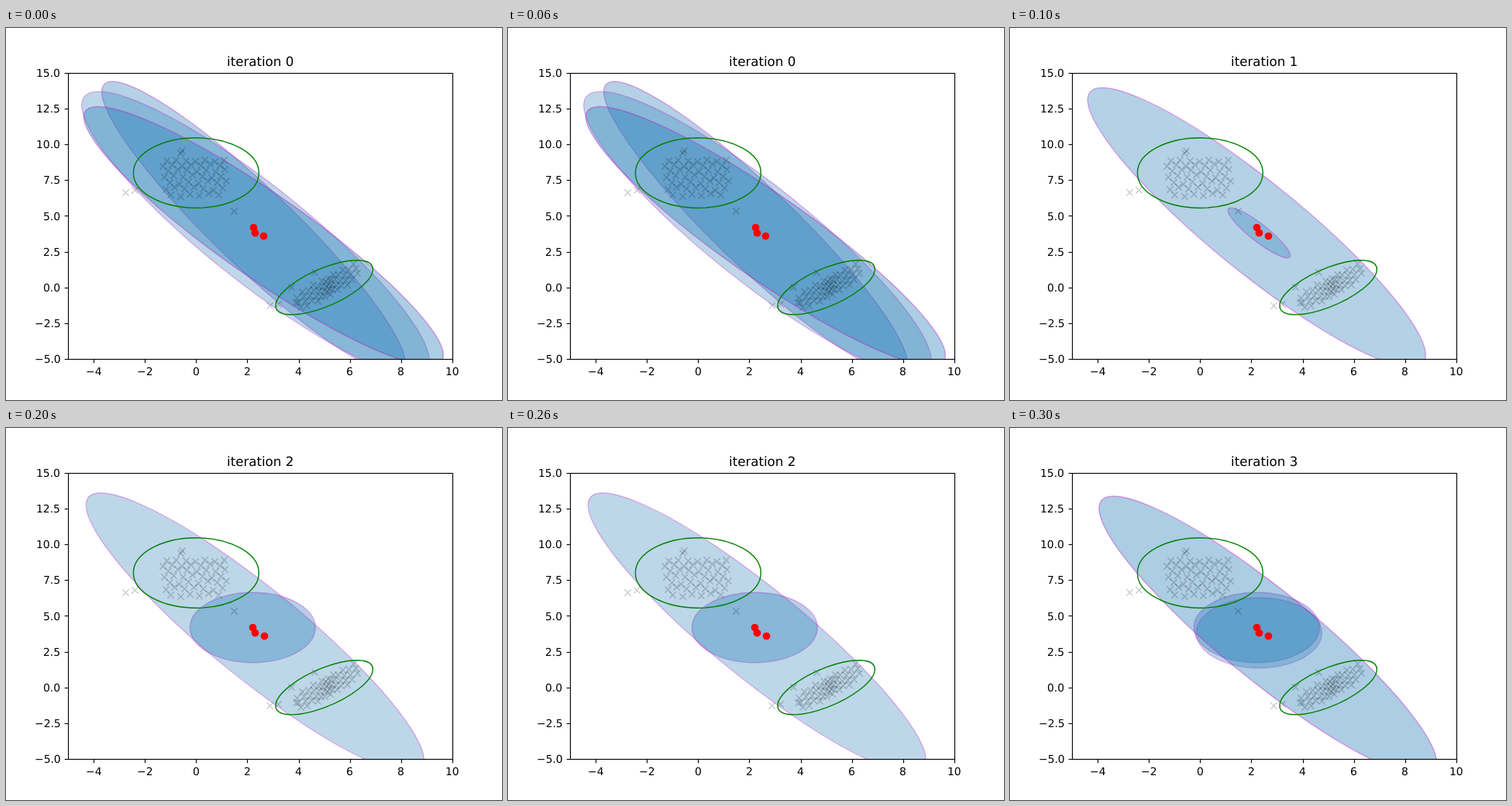
Animation, 640 px wide and 480 px high, one loop 0.4 s. Source, as an HTML page:

```html
<!DOCTYPE html>
<html lang="en">
<head>
<meta charset="utf-8">
<title>Mixture fit</title>
<style>
  html, body { margin: 0; width: 100%; height: 100%; overflow: hidden; background: #fff; }
  svg { display: block; width: 640px; height: 480px; }
  text { font: 13.889px "DejaVu Sans", sans-serif; text-rendering: geometricPrecision; white-space: pre; }
  #title text { font-size: 16.667px; }
  circle { vector-effect: non-scaling-stroke; }
</style>
</head>
<body>
<svg viewBox="0 0 640 480">
  <clipPath id="plot"><rect x="80" y="57.6" width="496" height="369.6"/></clipPath>
  <g id="blobs" clip-path="url(#plot)" fill="#1f77b4" stroke="#bf00bf" stroke-width="1.389"></g>
  <g id="marks" fill="none" stroke="#000" stroke-opacity=".2" stroke-width="1.389"></g>
  <g id="truth" fill="none" stroke="#008000" stroke-width="1.389"></g>
  <g id="means" fill="#f00"></g>
  <g id="axes" stroke="#000" stroke-width="1.111" fill="none"></g>
  <g id="labels"></g>
  <g id="title"></g>
</svg>
<script>
function add(parent, tag, attrs) {
  const el = document.createElementNS("http://www.w3.org/2000/svg", tag);
  for (const k in attrs) el.setAttribute(k, attrs[k]);
  return document.getElementById(parent).appendChild(el);
}
const px = x => 80 + (x + 5) * 496 / 15;
const py = y => 427.2 - (y + 5) * 369.6 / 20;
const snap = v => Math.floor(v + 0.5) + 0.5;
const center = v => Math.floor(v) + 0.5;

// Text starts on a whole pixel; align 0.5 centers it, 1 sets it flush right
function label(parent, text, x, y, align) {
  const el = add(parent, "text", { y: Math.round(y) });
  el.textContent = text.replace("-", "\u2212");
  el.setAttribute("x", Math.round(x - el.getComputedTextLength() * align));
  return el;
}

// Axes
add("axes", "rect", { x: 80.5, y: 58.5, width: 496, height: 369 });
for (let v = -4; v <= 10; v += 2) {
  add("axes", "path", { d: `M${snap(px(v))} 427.5v4.86` });
  label("labels", String(v), px(v), 447.5, 0.5);
}
for (let v = -5; v <= 15; v += 2.5) {
  add("axes", "path", { d: `M80.5 ${snap(py(v))}h-4.86` });
  label("labels", v.toFixed(1), 70.28, py(v) + 5.28, 1);
}
const titles = [0, 1, 2, 3].map(n => label("title", `iteration ${n}`, 328, 49.2, 0.5));

// Ellipse with half extents w, h and correlation r, mapped from a unit circle
const place = ([x, y], [w, h, r]) =>
  `matrix(${w} ${h * r} 0 ${h * Math.sqrt(1 - r * r)} ${x} ${y})`;

// 95% contour of a Gaussian with equal variances
function contour(variance, cov) {
  const reach = Math.sqrt(5.991 * variance);
  return [reach * 496 / 15, reach * 369.6 / 20, -cov / variance];
}
const round = contour(1, 0);
add("truth", "circle", { r: 1, transform: place([px(0), py(8)], round) });
add("truth", "circle", { r: 1, transform: place([px(5), py(0)], contour(0.6, 0.4)) });

// Samples: a few outliers, then two evenly scattered clusters
const cross = (x, y) => add("marks", "path", {
  d: `M${center(x) - 4.17} ${center(y) - 4.17}l8.34 8.34m0 -8.34l-8.34 8.34`
});
[[154, 212], [166, 209], [294, 236], [225, 161], [227, 158],
 [340, 358], [351, 356], [368, 334], [374, 354], [398, 315]].forEach(p => cross(...p));
for (let i = 1; i <= 48; i++) {
  const u = i * 0.7549 % 1, v = i * 0.5698 % 1;
  cross(201 + 86 * u, 168 + 50 * v ** 1.2);
  const s = 2 * u - 1, along = 42 * s * (0.5 + 0.5 * Math.abs(s));
  cross(415 + along, 333 - 0.53 * along + 26 * (v - 0.5));
}

// Fitted components
const wide = [218.1, 180.5, 0.913];
const narrow = [40.3, 32.4, 0.9];
const settled = [[318.3, 257.5], [321.4, 264.3], [333, 268.5]];
const initial = [[319.5, 257.5], [321.9, 264.4], [332.4, 268.5]];
const guesses = [[196, 188.5, 0.93], [224.2, 182.5, 0.902], [232, 167, 0.92]];

// Each iteration hands the wide fit to the next component; passed ones turn round
function shape(n, k) {
  if (n === 0) return guesses[k];
  if (k < n - 1) return round;
  if (k === n - 1) return wide;
  return n === 1 && k === 1 ? narrow : null;
}

const blobs = [0.335, 0.295, 0.37].map(a =>
  add("blobs", "circle", { r: 1, "fill-opacity": a, "stroke-opacity": a }));
const dots = blobs.map(() => add("means", "circle", { r: 4.86 }));

function draw(ms) {
  const n = Math.floor(ms / 100) % 4;
  titles.forEach((t, i) => t.setAttribute("display", i === n ? "inline" : "none"));
  (n ? settled : initial).forEach((mean, k) => {
    dots[k].setAttribute("cx", center(mean[0]));
    dots[k].setAttribute("cy", center(mean[1]));
    const s = shape(n, k);
    blobs[k].setAttribute("display", s ? "inline" : "none");
    if (s) blobs[k].setAttribute("transform", place(mean, s));
  });
}

const start = performance.now();
function tick() {
  draw(performance.now() - start);
  requestAnimationFrame(tick);
}
draw(0);
requestAnimationFrame(tick);
</script>
</body>
</html>
```
